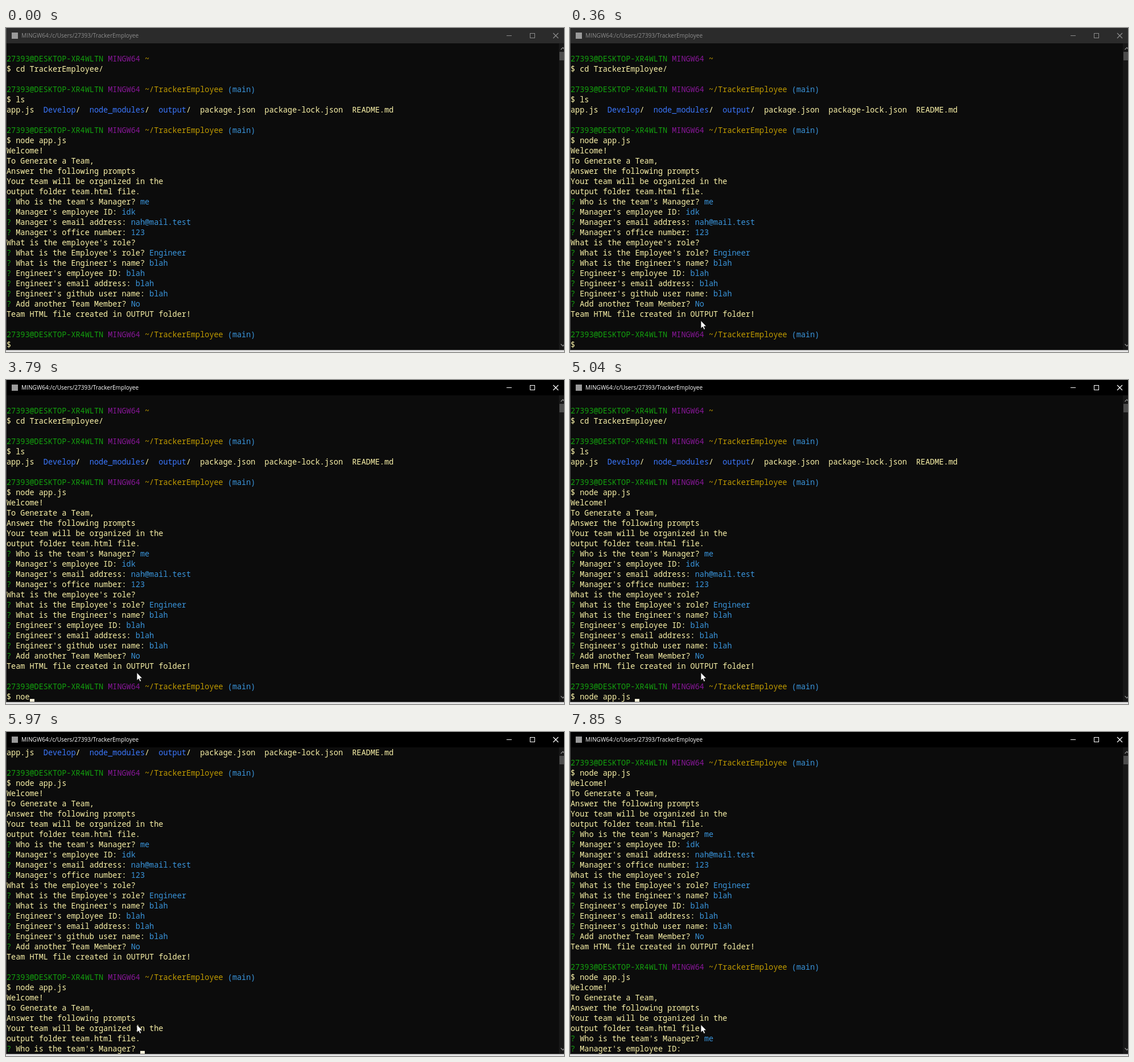
Animation of 981 by 571 pixels, one loop 8 s. Source, as an HTML page with a canvas:

```html
<!DOCTYPE html>
<html lang="en">
<head>
<meta charset="utf-8">
<title>Terminal</title>
<style>
  html, body { margin: 0; width: 100%; height: 100%; overflow: hidden; background: #0c0c0c; }
  canvas { display: block; width: 981px; height: 571px; }
</style>
</head>
<body>
<canvas id="stage" width="981" height="571"></canvas>
<script>
const ctx = document.getElementById('stage').getContext('2d');
const W = 981, H = 571, LOOP = 8000;
const CELL = 8.1, ROW = 18, LEFT = 1, TOP = 27, ROWS = 30;
const FOCUS = 2550, CLICK_END = 2620, RUN = 5590, ASK = 5970, ANSWER = 7680;

const C = {
  bg: '#0c0c0c', text: '#fbf3a9', green: '#13a10e', purple: '#881798',
  path: '#c19c00', cyan: '#3a96dd', blue: '#3b78ff', caret: '#f6f0d8'
};

// Each line is a list of [text, colour] runs.
const plain = s => [[s, C.text]];
const prompt = (path, branch = '') => [
  ['27393@DESKTOP-XR4WLTN', C.green], [' MINGW64', C.purple],
  [' ' + path, C.path], [branch, C.cyan]
];
const repo = () => prompt('~/TrackerEmployee', ' (main)');
const ask = (question, answer = '', color = C.cyan) =>
  [['?', C.green], [` ${question} `, C.text], [answer, color]];

const listing = [
  ['app.js  ', C.text], ['Develop', C.blue], ['/  ', C.text],
  ['node_modules', C.blue], ['/  ', C.text], ['output', C.blue],
  ['/  package.json  package-lock.json  README.md', C.text]
];

const intro = [
  'Welcome!', 'To Generate a Team,', 'Answer the following prompts',
  'Your team will be organized in the', 'output folder team.html file.'
].map(plain);

const MANAGER = "Who is the team's Manager?";
const ID = "Manager's employee ID:";

const history = [
  [], prompt('~'), plain('$ cd TrackerEmployee/'),
  [], repo(), plain('$ ls'), listing,
  [], repo(), plain('$ node app.js'), ...intro,
  ask(MANAGER, 'me'),
  ask(ID, 'idk'),
  ask("Manager's email address:", 'nah@mail.test'),
  ask("Manager's office number:", '123'),
  plain("What is the employee's role?"),
  ask("What is the Employee's role?", 'Engineer'),
  ask("What is the Engineer's name?", 'blah'),
  ask("Engineer's employee ID:", 'blah'),
  ask("Engineer's email address:", 'blah'),
  ask("Engineer's github user name:", 'blah'),
  ask('Add another Team Member?', 'No'),
  plain('Team HTML file created in OUTPUT folder!'),
  [], repo()
];

// Keystrokes, with one slip that is erased, and a completed file name.
const typing = [
  [0, ''], [3400, 'n'], [3480, 'no'], [3790, 'noe'], [4100, 'no'], [4170, 'nod'],
  [4330, 'node'], [4480, 'node '], [4630, 'node a'], [4800, 'node ap'],
  [4870, 'node app'], [5040, 'node app.js ']
];
const caretFlips = [3080, 6280, 6750, 7300, 7530, 7850];

const typedAt = t => typing.filter(k => k[0] <= t).pop()[1];
const caretOn = t => caretFlips.filter(f => f <= t).length % 2 === 1;

function linesAt(t) {
  const lines = [...history, plain('$ ' + typedAt(t))];
  if (t < RUN) return lines;
  if (t < ASK) return [...lines, []];
  lines.push(...intro);
  if (t < ANSWER) return [...lines, ask(MANAGER, t < 7530 ? '' : 'me', C.text)];
  return [...lines, ask(MANAGER, 'me'), ask(ID)];
}

function rect(x, y, w, h, color) {
  ctx.fillStyle = color;
  ctx.fillRect(x, y, w, h);
}

function stroke(points, color, width = 1) {
  ctx.strokeStyle = color;
  ctx.lineWidth = width;
  ctx.beginPath();
  points.forEach(([x, y]) => ctx.lineTo(x, y));
  ctx.stroke();
}

function drawTerminal(t) {
  const lines = linesAt(t).slice(-ROWS);
  ctx.font = '500 13.5px "Noto Sans Mono", monospace';
  lines.forEach((line, row) => {
    let col = 0;
    for (const [text, color] of line) {
      ctx.fillStyle = color;
      ctx.fillText(text, LEFT + col * CELL, TOP + row * ROW + 14);
      col += text.length;
    }
  });
  if (caretOn(t)) {
    const col = lines[ROWS - 1].reduce((n, run) => n + run[0].length, 0);
    rect(Math.round(LEFT + col * CELL), 562, 8, 5, C.caret);
  }
}

function drawFrame(active) {
  const ink = active ? '#ffffff' : '#8c8c8c';
  rect(0, 0, W, TOP, active ? '#000000' : '#2b2b2b');
  rect(10, 8, 11, 11, '#9a9a9a');
  ctx.font = '10.1px "Open Sans", "Noto Sans", sans-serif';
  ctx.fillStyle = ink;
  ctx.fillText('MINGW64:/c/Users/27393/TrackerEmployee', 27, 17);

  stroke([[880, 13.5], [889, 13.5]], ink);
  ctx.strokeRect(921.5, 9.5, 8, 8);
  stroke([[962, 9], [971, 18]], ink, 1.2);
  stroke([[971, 9], [962, 18]], ink, 1.2);

  rect(972, TOP, 9, 540, '#171717');
  rect(973, 42, 8, 15, '#4d4d4d');
  stroke([[975.5, 38], [979, 34.5], [982.5, 38]], '#8a8a8a', 1.3);
  stroke([[975.5, 557], [979, 560.5], [982.5, 557]], '#8a8a8a', 1.3);

  rect(0, 0, 1, 567, '#555555');
  rect(0, 567, W, 1, '#6a6a6a');
  rect(0, 568, W, 3, '#e4e4e4');
}

function drawPointer(t) {
  if (t < 70) return;
  const step = Math.min(4, Math.floor((t - 68) / 73));
  const far = (1 - step / 4) ** 2;
  ctx.save();
  ctx.translate(230 + 462 * far, 515.5 + 47 * far);
  ctx.beginPath();
  [[0, 0], [0, 14], [3.2, 11.2], [5.4, 16], [7.7, 15], [5.6, 10.4], [9.9, 10.2]]
    .forEach(([x, y]) => ctx.lineTo(x, y));
  ctx.closePath();
  ctx.lineWidth = 0.8;
  ctx.strokeStyle = '#000000';
  ctx.fillStyle = '#ffffff';
  ctx.fill();
  ctx.stroke();
  ctx.restore();
}

function drawClick() {
  ctx.fillStyle = 'rgba(255, 235, 0, 0.5)';
  ctx.beginPath();
  ctx.arc(229.5, 515, 13.5, 0, Math.PI * 2);
  ctx.fill();
}

function draw(t) {
  rect(0, 0, W, H, C.bg);
  drawTerminal(t);
  drawFrame(t >= FOCUS);
  drawPointer(t);
  if (t >= FOCUS && t < CLICK_END) drawClick();
}

const start = performance.now();
function tick() {
  draw((performance.now() - start) % LOOP);
  requestAnimationFrame(tick);
}
tick();
</script>
</body>
</html>
```
